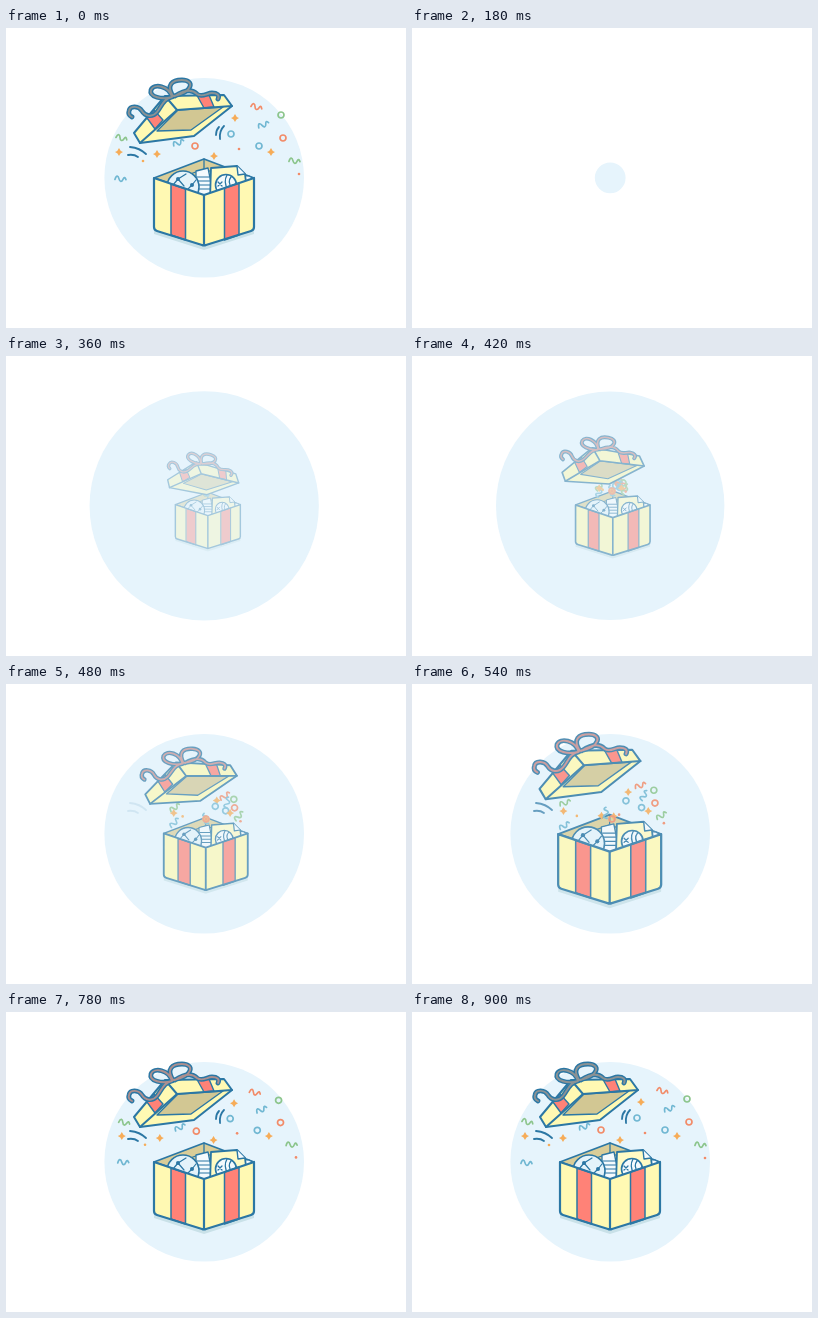
An HTML page with a canvas for the animation above (2.9 s loop, 400 px wide and 300 px high).

```html
<!DOCTYPE html>
<html lang="en">
<head>
<meta charset="utf-8">
<title>Gift box</title>
<style>
html, body { margin: 0; width: 100%; height: 100%; overflow: hidden; background: #fff; }
canvas { display: block; width: 400px; height: 300px; }
</style>
</head>
<body>
<canvas id="stage" width="400" height="300"></canvas>
<script>
const LOOP = 2900, STEP = 30, SETTLED = 885;
const LINE = '#2b77a4', CREAM = '#fff9b3', CORAL = '#ff8277', PALE = '#e6f4fc';
const ORANGE = '#f6ac58', RED = '#f28b68', GREEN = '#8cc58c', TEAL = '#70b7d2';

const stage = document.getElementById('stage').getContext('2d');
const layer = document.createElement('canvas');
layer.width = 400;
layer.height = 300;
const c = layer.getContext('2d');

const clamp = v => Math.max(0, Math.min(1, v));
const wave = v => (1 - Math.cos(Math.PI * clamp(v))) / 2;
const mix = (a, b, u) => a + (b - a) * u;

// Keys are rows of time followed by values.
function track(keys, t) {
  if (t <= keys[0][0]) return keys[0].slice(1);
  for (let i = 1; i < keys.length; i++) {
    const a = keys[i - 1], b = keys[i];
    if (t <= b[0]) {
      const u = (t - a[0]) / (b[0] - a[0]);
      return a.slice(1).map((v, k) => mix(v, b[k + 1], u));
    }
  }
  return keys[keys.length - 1].slice(1);
}

function paint(path, fill, stroke, width = 1.8) {
  const p = new Path2D(path);
  if (fill) { c.fillStyle = fill; c.fill(p); }
  if (stroke) { c.strokeStyle = stroke; c.lineWidth = width; c.stroke(p); }
}

function disc(x, y, r, fill, stroke, width = 1.6) {
  c.beginPath();
  c.arc(x, y, r, 0, 7);
  if (fill) { c.fillStyle = fill; c.fill(); }
  if (stroke) { c.strokeStyle = stroke; c.lineWidth = width; c.stroke(); }
}

function contents() {
  c.save();
  c.clip(new Path2D('M148 120H248V151L198 167L148 151Z'));
  paint('M190 143L202 140L208 170H190Z', '#f4fafd', LINE, 1.3);
  paint('M191 149H203M191 153H204M191 157H204M192 161H204', null, LINE, 1.2);
  disc(177, 159, 16, '#e4f3fa', LINE);
  disc(172, 151, 2, LINE);
  disc(186, 157, 2, LINE);
  paint('M167 157L172 151L180 146M181 162L186 157L190 152M172 151L178 158', null, LINE, 1.2);
  paint('M235 147L243 148L248 151L236 160Z', '#f4fafd', LINE, 1.3);
  paint('M205 140L231 138L239 146L242 172H204Z', '#fffbc4', LINE);
  paint('M231 138L232 147L239 146', '#f4fafd', LINE, 1.4);
  disc(220, 157, 10.5, '#f4fafd', LINE);
  paint('M221 147Q217 154 222 162M225 149Q221 154 226 160M212 154L216 158M216 154L212 158', null, LINE, 1.3);
  c.restore();
}

function box(scale) {
  c.save();
  c.translate(209, 146);
  c.scale(scale, scale);
  c.translate(-209, -146);
  paint('M148 198L198 214L248 198V206L198 222L148 206Z', '#c9e1e8');
  paint('M148 150L198 131L248 150L198 167Z', '#d9cd98', LINE);
  paint('M198 131V141L165 153M198 141L231 153', null, LINE, 1.3);
  contents();
  const front = 'M148 150L198 167L248 150V199Q248 202 245 203L200 217Q198 218 196 217L151 203Q148 202 148 199Z';
  paint(front, CREAM);
  paint('M165 156L179.5 161V212L165 207Z', CORAL, LINE, 1.5);
  paint('M218.5 160L233 155V207L218.5 212Z', CORAL, LINE, 1.5);
  paint(front + 'M198 167V217', null, LINE, 2.2);
  c.restore();
}

function lid([x, y, turn, scale], t) {
  c.save();
  c.translate(x, y);
  c.rotate(turn * Math.PI / 180);
  c.scale(scale, scale);
  c.translate(-177, -92.5);
  paint('M134 115L188 108L226 78L171 82Z', CREAM);
  paint('M151 103L172 82L217 79L185 102Z', '#d2c793', LINE, 1.4);
  paint('M128 105L159 68L171 82L134 115Z', CREAM);
  paint('M159 68L218 67L226 78L171 82Z', CREAM);
  paint('M141 90L148 82L157 92L149 101Z', CORAL, LINE, 1.4);
  paint('M191 67.5L203 67L208 79L198 80Z', CORAL, LINE, 1.4);
  paint('M128 105L159 68L218 67L226 78L171 82L134 115ZM159 68L171 82', null, LINE, 2);
  paint('M134 115L188 108L226 78', null, LINE, 2);

  const bow = 'M166 69C157 71 156 78 151 84C146 90 139 88 136 83C133 78 124 77 123 83C122 86 124 88 126 89' +
    'M166 69C163 58 148 55 145 62C143 69 156 72 166 69' +
    'M167 68C160 57 166 52 176 52C189 52 187 64 168 68' +
    'M169 68C180 61 187 62 191 66C196 70 201 65 206 65C211 65 214 67 212 71';
  const u = clamp((t - 690) / 210);
  paint(bow, null, LINE, 4.8);
  paint(bow, null, `rgb(${mix(196, 139, u)},${mix(140, 146, u)},${mix(140, 148, u)})`, 1.9);
  c.restore();
}

// Kind, resting place, colour, launch time, turn.
const pieces = [
  ['squiggle', 114, 151, TEAL, 385, 0.1], ['squiggle', 115, 110, GREEN, 385, 0.3],
  ['star', 113, 124, ORANGE, 385], ['dot', 137, 133, ORANGE, 385],
  ['star', 229, 90, ORANGE, 385], ['ring', 225, 106, TEAL, 385],
  ['squiggle', 250, 79, RED, 385, 0.3], ['ring', 275, 87, GREEN, 385],
  ['squiggle', 257, 97, TEAL, 385, -0.4], ['ring', 277, 110, RED, 385],
  ['ring', 253, 118, TEAL, 385], ['star', 265, 124, ORANGE, 385],
  ['squiggle', 288, 133, GREEN, 385, 0.1], ['dot', 293, 146, RED, 385],
  ['star', 151, 126, ORANGE, 500], ['squiggle', 172, 115, TEAL, 500, -0.4],
  ['star', 208, 128, ORANGE, 500], ['dot', 233, 121, RED, 500],
  ['ring', 189, 118, RED, 610]
];

function confetti(t) {
  for (const [kind, x, y, color, launch, turn = 0] of pieces) {
    const u = clamp((t - launch) / (SETTLED - launch));
    const p = 1 - Math.pow(1 - u, 2.2);
    c.save();
    c.translate(mix(200, x, p), mix(135, y, p) - 8 * p * (1 - p));
    if (kind === 'ring') disc(0, 0, 3, null, color, 1.7);
    if (kind === 'dot') disc(0, 0, 1.3, color);
    if (kind === 'star') paint('M0 -4Q1 -1 4 0Q1 1 0 4Q-1 1 -4 0Q-1 -1 0 -4Z', color);
    if (kind === 'squiggle') {
      c.rotate(turn - 1.5 * (1 - p));
      paint('M-5 1C-4 -4 -2 -3 -1 0S2 3 3 0S5 -2 6 0', null, color, 1.7);
    }
    c.restore();
  }
}

function swoosh(path, alpha) {
  c.globalAlpha = alpha;
  paint(path, null, LINE, 1.8);
  c.globalAlpha = 1;
}

function draw(t) {
  stage.fillStyle = '#fff';
  stage.fillRect(0, 0, 400, 300);
  if (t < 120) return;

  const r = t < 392
    ? Math.max(0.8, 118.5 * wave((t - 115) / 277))
    : mix(118.5, 99.8, wave((t - 392) / 88));
  stage.fillStyle = PALE;
  stage.beginPath();
  stage.arc(198.2, 149.8, r, 0, 7);
  stage.fill();

  const [alpha] = track([[240, 0], [360, 0.35], [480, 0.67], [540, 0.82], [630, 1]], t);
  if (!alpha) return;
  c.clearRect(0, 0, 400, 300);
  c.lineCap = c.lineJoin = 'round';
  const [scale] = track([[270, 0.55], [360, 0.65], [480, 0.84], [540, 1.03], [600, 1]], t);
  box(scale);
  confetti(t);
  lid(track([
    [270, 200, 132, 24, 0.6], [360, 197, 126, 18, 0.7], [480, 185, 102, 4, 0.92],
    [540, 178, 92, 0, 1.03], [600, 177, 92.5, 0, 1]
  ], t), t);
  swoosh('M124 119Q134 120 140 126M122 127Q128 126 132 129', clamp((t - 465) / 90));
  swoosh('M218 98Q213 103 214 111M213 99Q210 102 210 107', clamp((t - 560) / 80));

  stage.globalAlpha = alpha;
  stage.drawImage(layer, 0, 0);
  stage.globalAlpha = 1;
}

const start = performance.now();
function tick() {
  const t = (performance.now() - start) % LOOP;
  draw(t < STEP ? 900 : Math.floor(t / STEP) * STEP);
  requestAnimationFrame(tick);
}
tick();
</script>
</body>
</html>
```
